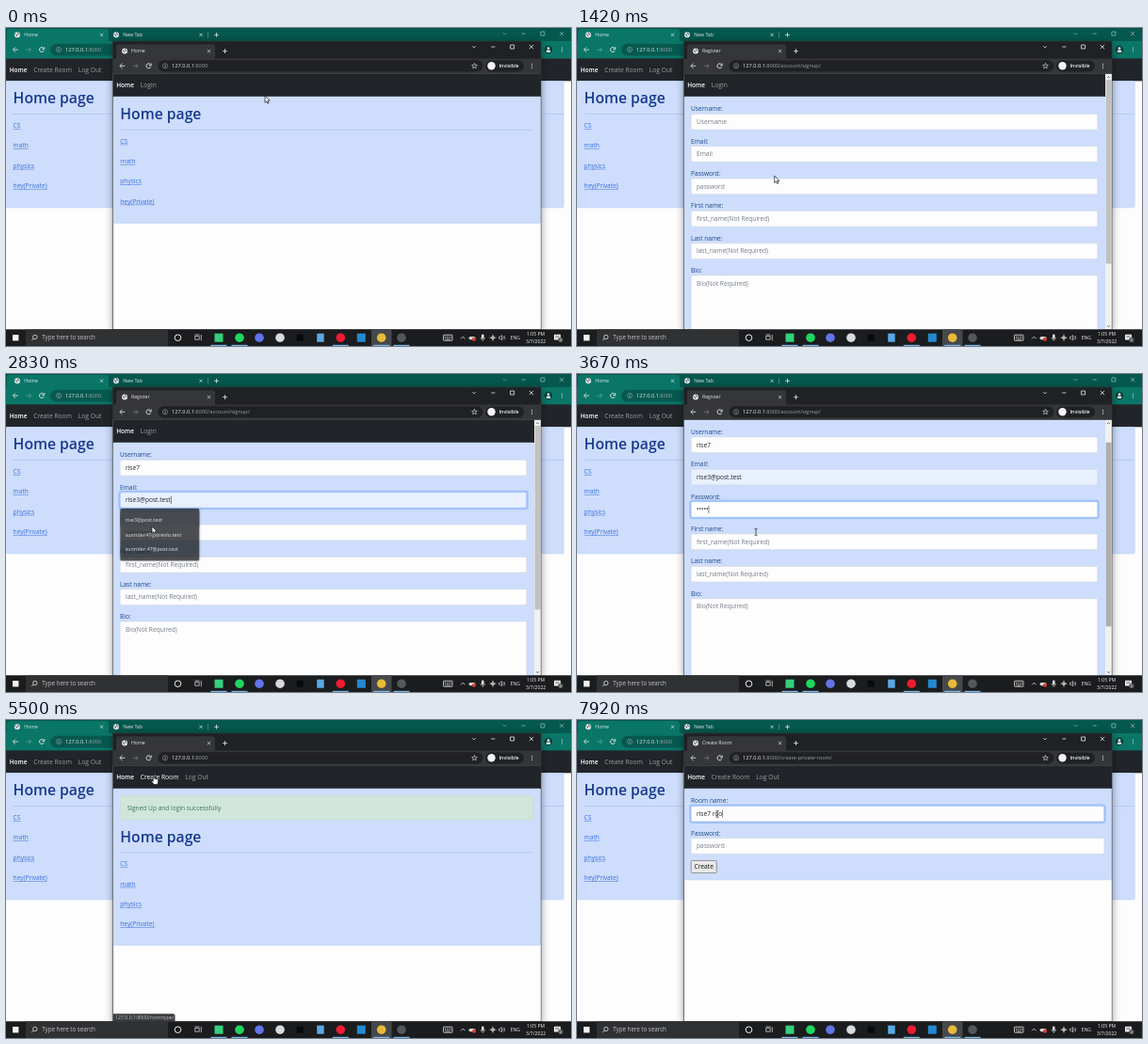
Write an HTML page with a canvas that moves like this. It is 600 px wide and 338 px high and loops after 8000 ms.

```html
<!DOCTYPE html>
<html lang="en">
<head>
<meta charset="utf-8">
<title>Room sign-up</title>
<style>
html, body { margin: 0; width: 100%; height: 100%; overflow: hidden; background: #fdfdfe; }
canvas { display: block; width: 600px; height: 338px; }
</style>
</head>
<body>
<canvas id="stage"></canvas>
<script>
const W = 600, H = 338, LOOP = 8000, STEP = 1000 / 12;
const canvas = document.getElementById('stage');
const c = canvas.getContext('2d');
const dpr = window.devicePixelRatio || 1;
canvas.width = W * dpr;
canvas.height = H * dpr;

const FONT = '"Open Sans", "Noto Sans", sans-serif';
const BLUE = '#cdddfb', INK = '#1c468f', LINK = '#3a6fdb', LIGHT = '#e8eaed', DIM = '#9aa0a6';
const USER = 'rise7', MAIL = 'rise3@post.test';
const LOGINS = ['7k20318659', 'wolmi', 'sunrider.47@post.test', 'rise3'];
const MAILS = [MAIL, 'sunrider47@brevlo.test', 'sunrider.47@post.test'];

// Page changes: start time, page, tab title, path
const PAGES = [
  [0, 'home', 'Home', ''],
  [583, 'login', 'Login', '/account/signin/'],
  [1330, 'register', 'Register', '/account/signup/'],
  [4583, 'member', 'Home', ''],
  [5915, 'create', 'Create Room', '/create-private-room/']
];

// Pointer stops: time, x, y, shape
const STOPS = [
  [0, 275, 72, 'arrow'], [80, 275, 72, 'arrow'], [480, 150, 59, 'hand'], [650, 150, 59, 'arrow'],
  [910, 207, 207, 'arrow'], [1160, 212, 184, 'hand'], [1330, 212, 184, 'arrow'], [1560, 205, 100, 'beam'],
  [1830, 207, 173, 'beam'], [2160, 207, 173, 'beam'], [2330, 180, 133, 'beam'], [2420, 180, 133, 'arrow'],
  [2660, 155, 162, 'arrow'], [2850, 155, 162, 'arrow'], [3080, 190, 168, 'beam'], [3880, 190, 168, 'arrow'],
  [4080, 142, 304, 'hand'], [4400, 142, 304, 'arrow'], [5200, 157, 59, 'hand'], [5915, 157, 59, 'arrow'],
  [6500, 149, 100, 'beam'], [8000, 149, 100, 'beam']
];

const clamp = v => Math.max(0, Math.min(1, v));
const ease = v => { v = clamp(v); return v * v * (3 - 2 * v); };
const typed = (s, t, from, gap) => s.slice(0, Math.max(0, Math.floor((t - from) / gap) + 1));

function rect(x, y, w, h, fill) {
  c.fillStyle = fill;
  c.fillRect(x, y, w, h);
}

function box(x, y, w, h, r, fill, stroke, lw = 0.5) {
  c.beginPath();
  c.roundRect(x, y, w, h, r);
  if (fill) { c.fillStyle = fill; c.fill(); }
  if (stroke) { c.strokeStyle = stroke; c.lineWidth = lw; c.stroke(); }
}

function disc(x, y, r, fill) {
  c.beginPath();
  c.arc(x, y, r, 0, 7);
  c.fillStyle = fill;
  c.fill();
}

function ring(x, y, r, color, lw = 0.8, from = 0, to = 7) {
  c.beginPath();
  c.arc(x, y, r, from, to);
  c.strokeStyle = color;
  c.lineWidth = lw;
  c.stroke();
}

// Open polyline relative to x, y
function line(x, y, pts, color, lw = 0.8) {
  c.beginPath();
  for (let i = 0; i < pts.length; i += 2) c.lineTo(x + pts[i], y + pts[i + 1]);
  c.strokeStyle = color;
  c.lineWidth = lw;
  c.stroke();
}

// Text centred vertically on its capitals; returns the width
function text(s, x, y, size, fill, weight = 400) {
  c.font = `${weight} ${size}px ${FONT}`;
  c.fillStyle = fill;
  c.fillText(s, x, y + size * 0.36);
  return c.measureText(s).width;
}

function cross(x, y, r, color, lw) {
  line(x, y, [-r, -r, r, r], color, lw);
  line(x, y, [-r, r, r, -r], color, lw);
}

function plus(x, y) {
  line(x, y, [-2.4, 0, 2.4, 0], LIGHT);
  line(x, y, [0, -2.4, 0, 2.4], LIGHT);
}

function globe(x, y) {
  disc(x, y, 3, LIGHT);
  line(x, y, [-2.4, -0.8, -0.6, 0, -0.2, 1.6], '#45494d', 0.9);
  line(x, y, [0.4, -2.4, 0.8, -0.9, 2.3, -0.2], '#45494d', 0.9);
}

function dots(x, y) {
  for (const d of [-2, 0, 2]) disc(x, y + d, 0.6, LIGHT);
}

function controls(x, y, gap, color) {
  line(x, y, [-1.8, -0.8, 0, 1, 1.8, -0.8], color, 0.7);
  line(x + gap, y, [-2, 0, 2, 0], color, 0.8);
  box(x + 2 * gap - 2, y - 2, 4, 4, 0, null, color, 0.8);
  cross(x + 3 * gap, y, 2.1, color, 0.8);
}

function navButtons(x, y, loading, faded) {
  line(x, y, [2.8, 0, -2.5, 0], LIGHT);
  line(x, y, [0, -2.6, -2.6, 0, 0, 2.6], LIGHT);
  line(x + 14, y, [-2.8, 0, 2.5, 0], faded);
  line(x + 14, y, [0, -2.6, 2.6, 0, 0, 2.6], faded);
  if (loading) return cross(x + 28, y, 2.1, LIGHT, 0.9);
  ring(x + 28, y, 2.5, LIGHT, 0.9, 0.4, 5.5);
  line(x + 28, y, [2.7, -2.8, 2.7, -0.5, 0.4, -0.5], LIGHT, 0.9);
}

function address(x, y, path) {
  ring(x, y, 2.6, DIM, 0.6);
  rect(x - 0.3, y - 0.4, 0.6, 1.8, LIGHT);
  rect(x - 0.3, y - 1.5, 0.6, 0.6, LIGHT);
  const host = text('127.0.0.1', x + 7, y, 5.65, LIGHT);
  text(':8000' + path, x + 7 + host, y, 5.65, DIM);
}

function navbar(x, y, w, h, member) {
  rect(x, y, w, h, '#212529');
  const mid = y + h / 2;
  text('Home', x + 3.7, mid, 6.5, '#fff', 600);
  const items = member ? [['Create Room', 29.3], ['Log Out', 76.8]] : [['Login', 29.3]];
  for (const [s, dx] of items) text(s, x + dx, mid, 6.7, '#9b9d9f');
}

function panel(x, y, w, h) {
  box(x, y, w, h, 1.5, BLUE, '#b9d0f8');
}

function roomList(x, y, right) {
  text('Home page', x, y + 18.3, 15.7, '#17398d', 600);
  rect(x, y + 35, right - x, 0.5, '#a5b9df');
  ['CS', 'math', 'physics', 'hey(Private)'].forEach((s, i) => {
    const ly = y + 47.3 + 21.3 * i;
    const w = text(s, x, ly, 6.6, LINK);
    rect(x, ly + 3.4, w, 0.5, LINK);
  });
}

function field(label, y, right, hint, value, focus, fill = '#fdfdfe', h = 17) {
  text(label, 121, y, 6.6, INK);
  const top = y + 5.2;
  if (focus) box(120.3, top - 0.7, right - 119.6, h + 1.4, 2.2, null, '#a3c2fb', 2);
  box(121.2, top + 0.2, right - 121.4, h - 0.4, 1.6, fill, focus ? '#7fabf5' : '#ced4da');
  const mid = top + 8.5;
  const w = value ? text(value, 127, mid, 6.6, '#212529') : text(hint, 127, mid, 6.6, '#747c84');
  if (focus) rect(127.3 + (value ? w : 0), mid - 4, 0.5, 8, '#111');
}

function button(s, y, w) {
  box(121.2, y, w, 13, 1, '#e9e9ea', '#767676', 0.7);
  text(s, 124.5, y + 6.5, 6.7, '#111');
}

function dropdown(y, rows, alpha, marked) {
  c.save();
  c.globalAlpha = alpha;
  c.shadowColor = 'rgba(0,0,0,.35)';
  c.shadowBlur = 3 * dpr;
  box(121.3, y, 84, 8 + 15.8 * rows.length, 1.5, '#212327');
  c.shadowColor = 'transparent';
  if (marked) rect(121.3, y + 4, 84, 15.8, '#4a4d52');
  rows.forEach((s, i) => text(s, 126.5, y + 11.8 + 15.8 * i, 5.3, '#f0f1f3', 600));
  c.restore();
}

function backWindow() {
  rect(0, 0, W, 14, '#04584e');
  box(1, 1, 108, 14, [3, 3, 0, 0], '#0a7668');
  rect(0, 14, W, 18.5, '#0a7668');
  globe(12, 7.3);
  text('Home', 19.3, 7.3, 5.2, LIGHT);
  cross(101.5, 7.3, 1.6, LIGHT, 0.7);
  globe(117, 7.3);
  text('New Tab', 124.3, 7.3, 5.2, LIGHT);
  cross(207, 7.3, 1.6, LIGHT, 0.7);
  rect(214.5, 4, 0.5, 7, '#7eb0a8');
  plus(223.5, 7.3);
  controls(529.5, 6, 20.2, '#8ab5af');
  navButtons(10, 23, false, '#5fa59b');
  box(47, 16.8, 506, 12.6, 6.3, '#07594f');
  address(56, 23, '');
  disc(576, 23, 4.2, '#063f39');
  disc(576, 21.7, 1.4, LIGHT);
  box(573.7, 23.6, 4.6, 2.4, 1.2, LIGHT);
  dots(590.5, 23);
  navbar(0, 32.5, W, 24, true);
  rect(0, 56.5, W, 264, '#fdfdfe');
  panel(0.3, 56.5, 592, 134.5);
  roomList(7.6, 56.5, 592);
}

function frontChrome(title, path, loading) {
  rect(113.5, 14, 454.5, 19, '#202124');
  box(117, 17.2, 105, 17, [3, 3, 0, 0], '#35363a');
  rect(113.5, 32.6, 454.5, 16, '#35363a');
  if (!loading) globe(126, 24.6);
  text(title, 133, 24.6, 5.2, LIGHT);
  cross(215.5, 24.6, 1.6, LIGHT, 0.7);
  plus(232.5, 24.6);
  controls(497, 20, 20.3, LIGHT);
  navButtons(123.5, 40.3, loading, '#77797d');
  box(161.5, 34.2, 345, 12.3, 6.1, '#202124');
  address(169, 40.3, path);
  c.beginPath();
  for (let i = 0; i < 10; i++) {
    const a = -Math.PI / 2 + i * Math.PI / 5, r = i % 2 ? 1.3 : 3;
    c.lineTo(497.5 + r * Math.cos(a), 40.4 + r * Math.sin(a));
  }
  c.closePath();
  c.strokeStyle = LIGHT;
  c.lineWidth = 0.6;
  c.stroke();
  box(509, 34.4, 41, 12, 6, '#202124');
  disc(515.5, 40.3, 4.2, '#f1f3f4');
  text('Invisible', 523.5, 40.3, 5.3, '#f1f3f4', 600);
  dots(558.5, 40.3);
}

function registerPage(t) {
  const scroll = 88 * ease((t - 3580) / 250);
  const right = 553;
  c.save();
  c.translate(0, -scroll);
  navbar(113.5, 48.5, 447.5, 24.5, false);
  panel(113.7, 73, 447, 329);
  const name = typed(USER, t, 1650, 65);
  const mail = t >= 2580 ? MAIL : '';
  const pass = typed('•••••', t, 3160, 75);
  field('Username:', 86, right, 'Username', name, t > 1570 && t < 2380);
  field('Email:', 120.3, right, 'Email', mail, t >= 2380 && t < 3080, mail ? '#e8f0fe' : undefined);
  field('Password:', 154.7, right, 'password', pass, t >= 3080 && t < 4150);
  field('First name:', 189, right, 'first_name(Not Required)');
  field('Last name:', 223.4, right, 'last_name(Not Required)');
  field('Bio:', 257.7, right, 'Bio(Not Required)', '', false, '#fdfdfe', 111.5);
  line(551, 372.5, [-2, 0.5, 0.5, -2], '#888', 0.4);
  button('Register', 381.5, 32);
  if (t >= 2420 && t < 3000) dropdown(143, MAILS, 1 - ease((t - 2740) / 260) * 0.95, t > 2580);
  c.restore();

  rect(561, 48.5, 7, 272, '#f1f1f1');
  box(561.6, 55 + scroll * 0.727, 5.8, 195.5, 0, t > 3580 && t < 4583 ? '#adadad' : '#c1c1c1');
  line(564.5, 52.3, [-1.4, 0.8, 0, -0.8, 1.4, 0.8], '#555', 0.8);
  line(564.5, 317, [-1.4, -0.8, 0, 0.8, 1.4, -0.8], '#555', 0.8);
}

function page(name, t) {
  rect(113.5, 48.5, 454.5, 272, '#fdfdfe');
  if (name === 'register') return registerPage(t);
  const member = name === 'member' || name === 'create';
  navbar(113.5, 48.5, 454.5, 24.5, member);
  const heights = { home: 134.5, login: 128.5, member: 166.5, create: 97 };
  panel(113.7, 73, 454, heights[name]);

  if (name === 'home') roomList(121.3, 73, 560);
  if (name === 'login') {
    field('Username:', 86, 560, 'Username', '', true);
    field('Password:', 120.3, 560, 'password');
    button('Login', 149.5, 24);
    text('Don\u2019t have account? create one', 128, 185.3, 6.6, LINK);
    if (t > 660) dropdown(108, LOGINS, 1, false);
  }
  if (name === 'member') {
    box(121.2, 80.5, 439, 25.5, 1.5, '#d0e6da', '#bcdacb');
    text('Signed Up and login successfully', 128.7, 93.2, 6.6, '#3f7360');
    roomList(121.3, 105.7, 560);
    if (t > 5150) {
      text('Create Room', 142.8, 60.75, 6.7, '#c9cacc');
      box(113.5, 312.3, 66, 8.2, [0, 2, 0, 0], '#3c3d41');
      text('127.0.0.1:8000/roomtype/', 116, 316.4, 5.2, '#b9bcc0');
    }
  }
  if (name === 'create') {
    field('Room name:', 86, 560, 'room name', typed(USER + ' room', t, 6700, 150), t > 6500);
    field('Password:', 120.3, 560, 'password');
    button('Create', 149.5, 27);
  }
}

function frontWindow(t) {
  const [, name, title, path] = PAGES.filter(p => p[0] <= t).pop();
  c.save();
  c.shadowColor = 'rgba(0,0,0,.5)';
  c.shadowBlur = 9 * dpr;
  c.shadowOffsetY = 2 * dpr;
  rect(113.5, 14, 454.5, 306.5, '#202124');
  c.restore();
  c.save();
  c.beginPath();
  c.rect(113.5, 48.5, 454.5, 272);
  c.clip();
  page(name, t);
  c.restore();
  frontChrome(title, path, t > 4160 && t < 4583);
  box(113.3, 14, 454.9, 307, 0, null, '#3b3d40');
}

function taskbar() {
  const y = 329.2;
  rect(0, 320.4, W, 17.6, '#1b1c1e');
  rect(21, 320.4, 151, 17.6, '#303133');
  rect(7, y - 3.2, 6.4, 6.4, '#f2f2f2');
  ring(30.8, y - 0.7, 2.2, '#e6e6e6');
  line(29.2, y + 0.9, [0, 0, -2, 2], '#e6e6e6');
  text('Type here to search', 38.3, y, 6.2, '#c4c4c5');
  ring(182.5, y, 3.3, '#f2f2f2', 1);
  box(200.7, y - 1.6, 4.5, 3.6, 0, null, '#e6e6e6', 0.7);
  line(200.5, y, [0, -3.2, 5, -3.2], '#e6e6e6', 0.7);
  line(207.3, y, [0, -3.2, 0, 3], '#e6e6e6', 0.7);

  rect(388, 320.4, 21.5, 17.6, '#46484b');
  rect(221.5, y - 4.5, 9, 9, '#35d07c');
  disc(248, y, 4.8, '#1ed760');
  disc(269, y, 4.8, '#6274e8');
  disc(291, y, 4.8, '#d9dadb');
  rect(308.7, y - 3.4, 7, 6.8, '#08090a');
  rect(330.2, y - 4.5, 7.5, 9, '#58a9e6');
  disc(355.3, y, 4.8, '#ee1c32');
  rect(372.8, y - 4.5, 9, 9, '#2489d1');
  disc(398.7, y, 4.8, '#e8b93a');
  disc(420, y, 4.8, '#55575b');
  for (const x of [226, 248, 355.3, 398.7, 420]) rect(x - 8.5, 336.8, 17, 1.2, '#79b9e8');

  box(464.5, y - 3, 9.5, 6, 0.5, null, '#e6e6e6', 0.8);
  for (let i = 0; i < 8; i++) rect(466 + (i % 4) * 1.9, y - 1.5 + Math.floor(i / 4) * 1.7, 1, 0.9, '#e6e6e6');
  rect(467, y + 1.6, 4.5, 0.6, '#e6e6e6');
  line(485.3, y, [-2.2, 1.1, 0, -1.1, 2.2, 1.1], '#e6e6e6');
  box(491.5, y - 1.3, 7, 3.4, 1.7, '#d8d8d8');
  disc(497, y + 1.6, 2, '#e23b3b');
  box(505, y - 3.6, 2.6, 4.6, 1.3, '#e6e6e6');
  ring(506.3, y - 0.2, 2.3, '#e6e6e6', 0.6, 0, Math.PI);
  line(506.3, y, [0, 2.1, 0, 3.6], '#e6e6e6', 0.6);
  ring(517, y, 1.5, '#e6e6e6', 0.8);
  line(517, y, [-3.5, 0, 3.5, 0], '#e6e6e6', 0.7);
  line(517, y, [0, -3.5, 0, 3.5], '#e6e6e6', 0.7);
  line(525, y, [-1.5, -1, 0, -1, 1.5, -2.7, 1.5, 2.7, 0, 1, -1.5, 1, -1.5, -1], '#e6e6e6', 0.6);
  for (const r of [1.7, 3.2]) ring(526.5, y, r, '#e6e6e6', 0.6, -0.8, 0.8);
  text('ENG', 535.8, y, 5, '#f0f0f0');
  text('1:05 PM', 553, 325, 5.1, '#f0f0f0');
  text('3/7/2022', 552, 333.2, 5.1, '#f0f0f0');
  box(582, y - 3.4, 7, 5.6, 0.5, '#f0f0f0');
  for (const d of [-1.8, -0.3]) line(583.3, y, [0, d, 4.3, d], '#333', 0.5);
  disc(589, y + 2.2, 2.6, '#55585c');
  text('2', 587.8, y + 2.2, 4, '#fff');
}

function outline(pts) {
  c.beginPath();
  for (let i = 0; i < pts.length; i += 2) c.lineTo(pts[i], pts[i + 1]);
  c.closePath();
  c.fillStyle = '#fff';
  c.strokeStyle = '#111';
  c.lineWidth = 0.7;
  c.fill();
  c.stroke();
}

function pointer(t) {
  let i = STOPS.length - 2;
  while (STOPS[i][0] > t) i--;
  const [t0, x0, y0, shape] = STOPS[i], [t1, x1, y1] = STOPS[i + 1];
  const k = ease((t - t0) / (t1 - t0));
  const moving = x0 !== x1 || y0 !== y1;
  const kind = moving && k > 0.25 && shape === 'hand' ? 'arrow' : shape;
  c.save();
  c.translate(x0 + (x1 - x0) * k, y0 + (y1 - y0) * k);
  c.lineJoin = 'round';
  if (kind === 'arrow') {
    outline([0, 0, 0, 7.3, 1.7, 5.8, 2.9, 8.3, 4, 7.8, 2.9, 5.3, 5.2, 5.2]);
  } else if (kind === 'hand') {
    outline([-0.7, 0.2, 0.6, 0.2, 0.7, 3.2, 4.6, 4.2, 4.7, 7, 3.8, 9.6, 0, 9.6, -2.6, 6, -1.9, 5.2, -0.7, 6.2]);
  } else {
    line(0, 0, [-1.5, -3.6, 0, -3.1, 1.5, -3.6], '#222', 0.7);
    line(0, 0, [0, -3.1, 0, 3.1], '#222', 0.7);
    line(0, 0, [-1.5, 3.6, 0, 3.1, 1.5, 3.6], '#222', 0.7);
  }
  c.restore();
}

function draw(now) {
  const t = Math.floor((now % LOOP) / STEP + 0.05) * STEP;
  c.setTransform(dpr, 0, 0, dpr, 0, 0);
  backWindow();
  frontWindow(t);
  taskbar();
  pointer(t);
}

const start = performance.now();
function tick() {
  draw(performance.now() - start);
  requestAnimationFrame(tick);
}
tick();
</script>
</body>
</html>
```
